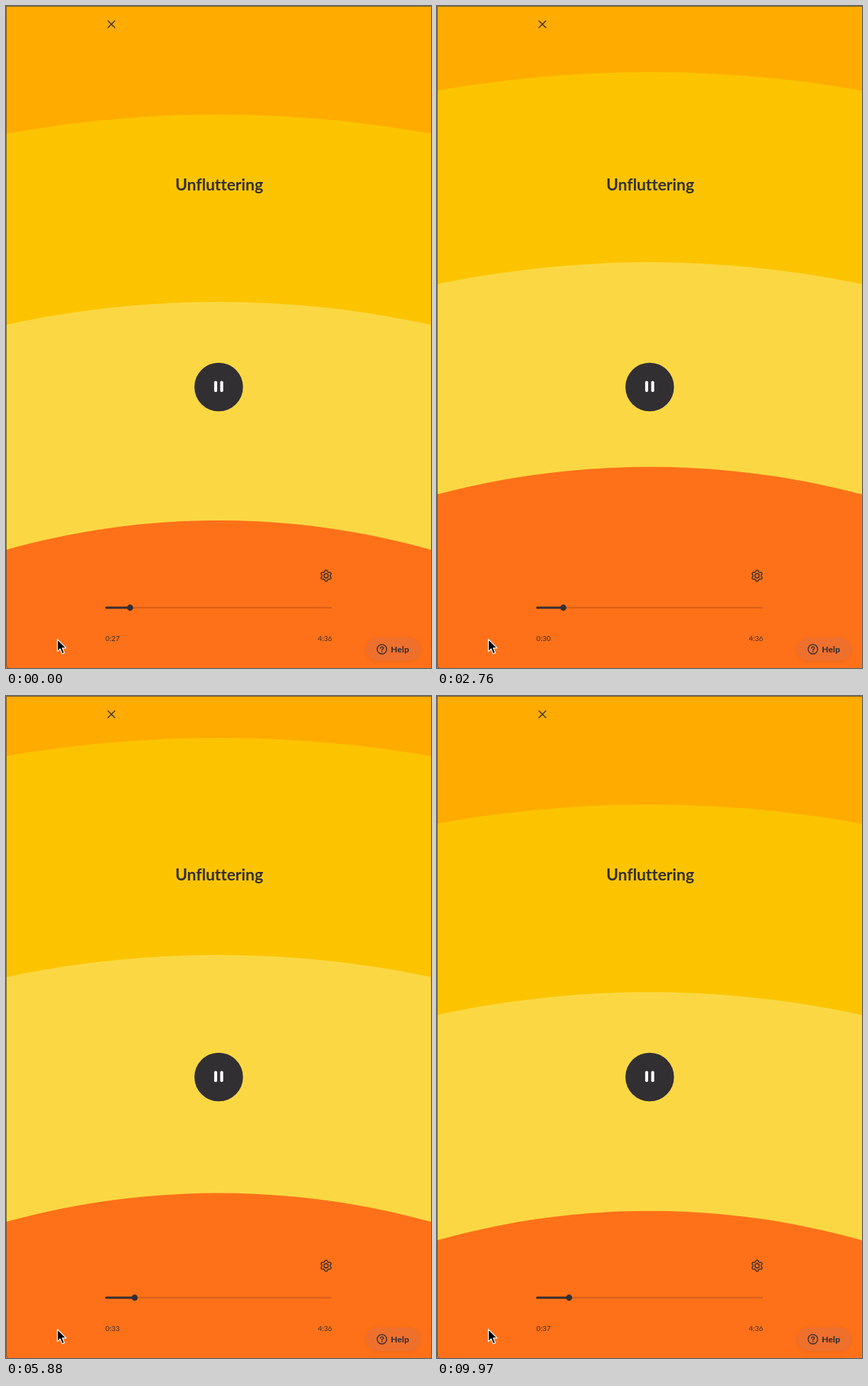
These frames come from a looping animation (600x933 px, 10000 ms). An HTML page:

```html
<!DOCTYPE html>
<html lang="en">
<head>
<meta charset="utf-8">
<title>Player</title>
<style>
  html, body { margin: 0; width: 100%; height: 100%; overflow: hidden; background: #ffab00; }
  svg { display: block; width: 600px; height: 933px; }
  text { font-family: Lato, sans-serif; fill: #322f33; }
  .title { font-size: 23px; font-weight: 700; letter-spacing: -.1px; }
  .time { font-size: 10px; letter-spacing: .1px; }
  .help { font-size: 12px; font-weight: 800; letter-spacing: .2px; }
  .line { fill: none; stroke: #322f33; stroke-width: 1.4; stroke-linecap: round; stroke-linejoin: round; }
</style>
</head>
<body>
<svg viewBox="0 0 600 933">
  <defs>
    <filter id="soft" x="-20%" y="-40%" width="140%" height="180%">
      <feGaussianBlur stdDeviation="2.5"/>
    </filter>
  </defs>

  <rect width="600" height="933" fill="#ffab00"/>
  <g id="rings">
    <circle cx="300" cy="1830" fill="#fcc400"/>
    <circle cx="300" cy="1830" fill="#fbd843"/>
    <circle cx="300" cy="1830" fill="#fe7118"/>
  </g>
  <path d="M600 .5H.5V929.5Q.5 932.5 3.5 932.5" fill="none" stroke="#4a4638" stroke-opacity=".75"/>

  <path class="line" d="M144 21l9.6 9.6M153.600 21l-9.600 9.600"/>
  <text class="title" x="301" y="260" text-anchor="middle">Unfluttering</text>

  <circle cx="300.3" cy="537" r="34.3" fill="#322f33"/>
  <g fill="#fff">
    <rect x="293.900" y="528.500" width="4.200" height="15.500" rx="1.700"/>
    <rect x="302.400" y="528.500" width="4.200" height="15.500" rx="1.700"/>
  </g>

  <g transform="translate(451.900 803)">
    <path id="gear" class="line"/>
    <circle class="line" r="3"/>
  </g>

  <rect x="140" y="846.700" width="320" height="2.600" rx="1.300" fill="#d8601a"/>
  <rect id="played" x="140" y="846.500" height="3" rx="1.500" fill="#322f33"/>
  <circle id="thumb" cy="848" r="4.400" fill="#322f33"/>
  <text id="clock" class="time" x="140.300" y="895"></text>
  <text class="time" x="460.500" y="895" text-anchor="end">4:36</text>

  <rect x="508" y="891" width="77" height="33" rx="16.500" fill="#b04a18" opacity=".22" filter="url(#soft)"/>
  <rect x="508" y="890" width="77" height="33" rx="16.500" fill="#ef702d"/>
  <circle class="line" cx="530.700" cy="906.600" r="6.700"/>
  <path class="line" d="M528.800 905.200q0-2.100 2-2.100t2 1.900q0 1.200-2 2.100v.7"/>
  <circle cx="530.800" cy="909.900" r=".85" fill="#322f33"/>
  <text class="help" x="543.200" y="910.800">Help</text>

  <path d="M72.500 892.500v17.300l4-3.800 2.900 6.900 3-1.300-2.900-6.700h5.400z"
        fill="#000" stroke="#fff" stroke-width="1.200" stroke-linejoin="round"/>
</svg>
<script>
  const LOOP = 10, CENTER = 1830, LENGTH = 276, START = 27.3;
  const keys = [0, 1.91, 3.82, 5.88, 7.18, 8.42];
  const crests = [
    [153, 115, 69, 59, 84, 125],
    [417, 375, 351, 365, 399, 421.5],
    [725, 662, 649, 700.5, 738, 747.5]
  ];
  const $ = id => document.getElementById(id);
  const rings = [...$('rings').children];
  const n = keys.length;
  const keyTime = i => keys[(i + n) % n] + LOOP * Math.floor(i / n);

  // Smooth periodic curve through the keys
  function curve(ys, t) {
    const y = i => ys[(i + n) % n];
    const rate = i => (y(i + 1) - y(i)) / (keyTime(i + 1) - keyTime(i));
    const slope = i => {
      const a = keyTime(i) - keyTime(i - 1), b = keyTime(i + 1) - keyTime(i);
      return (rate(i - 1) * b + rate(i) * a) / (a + b);
    };
    let i = n - 1;
    while (keys[i] > t) i--;
    const d = keyTime(i + 1) - keyTime(i), s = (t - keyTime(i)) / d, r = 1 - s;
    return y(i) * r * r * (1 + 2 * s) + y(i + 1) * s * s * (3 - 2 * s)
         + d * s * r * (slope(i) * r - slope(i + 1) * s);
  }

  function gearPath() {
    const pts = [];
    for (let k = 0; k < 96; k++) {
      const a = k / 96 * 2 * Math.PI;
      const r = 6.8 + Math.max(-.9, Math.min(.9, 1.5 * Math.cos(6 * a)));
      pts.push((r * Math.sin(a)).toFixed(2) + ' ' + (-r * Math.cos(a)).toFixed(2));
    }
    return 'M' + pts.join('L') + 'Z';
  }
  $('gear').setAttribute('d', gearPath());

  function draw(now) {
    const t = now / 1000 % LOOP;
    rings.forEach((ring, i) => ring.setAttribute('r', CENTER - curve(crests[i], t)));

    const played = START + t;
    const x = 144.5 + Math.floor(played * 4) / 4 / LENGTH * 311;
    $('played').setAttribute('width', x - 140);
    $('thumb').setAttribute('cx', x);
    $('clock').textContent = '0:' + Math.floor(played);
  }

  const begin = performance.now();
  function tick() {
    draw(performance.now() - begin);
    requestAnimationFrame(tick);
  }
  tick();
</script>
</body>
</html>
```
